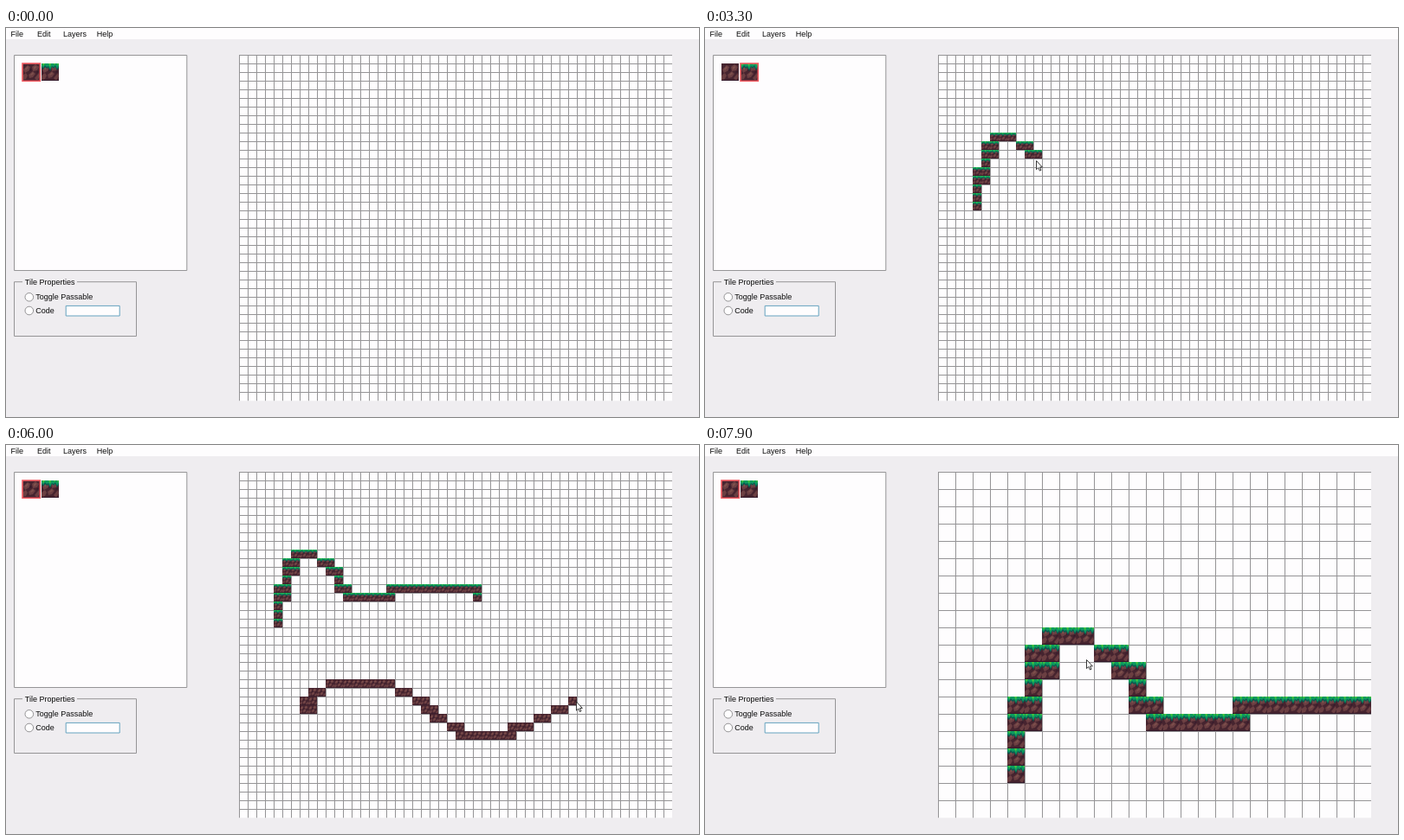
An HTML page that plays this animation: 800 px wide and 450 px high, repeating every 8 s.

```html
<!DOCTYPE html>
<html lang="en">
<head>
<meta charset="utf-8">
<title>Tile map editor</title>
<style>
html, body { margin: 0; width: 100%; height: 100%; overflow: hidden; background: #efedf0; }
svg { display: block; width: 800px; height: 450px; }
text { font: 9px "Liberation Sans", Arial, sans-serif; fill: #0c0c0c; }
.line { fill: none; stroke: #959496; }
.paper { fill: #fefdfe; }
</style>
</head>
<body>
<svg viewBox="0 0 800 450">
  <defs>
    <g id="dirt">
      <path fill="#46242f" d="M0 0H20V20H0Z"/>
      <g fill="#6b3f42">
        <path d="M1 7L6 2 9 4 8 8 3 11Z"/>
        <path d="M11 4L15 1 19 4 17 8 12 9Z"/>
        <path d="M7 13L12 9 15 12 12 16 8 17Z"/>
        <path d="M0 14L4 11 6 14 4 18 0 19Z"/>
        <path d="M14 17L19 11 20 15 17 20Z"/>
      </g>
      <path fill="#7e504c" d="M3 6L6 3 7 5 4 8ZM13 4L16 3 16 5 13 7ZM9 13L12 10 13 12 10 14Z"/>
      <path fill="#341a2b" d="M0 19H20V20H0ZM9 5L11 8 8 9ZM17 9L19 9 16 12Z"/>
    </g>
    <g id="grass">
      <use href="#dirt"/>
      <path fill="#0b5a50" d="M0 0H20V5L18 8 16 4 14 6 12 4 10 9 8 5 6 6 4 4 2 7 0 5Z"/>
      <path fill="#0b9a5f" d="M0 0H20V3L18 6 16 2 14 4 12 3 10 7 8 3 6 4 4 2 2 5 0 3Z"/>
      <path fill="#49c43c" d="M1 0H4L2 3ZM8 0H11L10 4ZM14 0H16L15 2ZM18 0H20L19 3Z"/>
    </g>
    <clipPath id="stage"><path d="M269 31H769V431.5H269Z"/></clipPath>
  </defs>

  <path fill="#efedf0" d="M0 0H800V450H0Z"/>
  <path class="paper" d="M0 0H800V13H0Z"/>
  <text x="5.5" y="9.6">File</text>
  <text x="36" y="9.6">Edit</text>
  <text x="66" y="9.6">Layers</text>
  <text x="104.7" y="9.6">Help</text>

  <path class="line paper" d="M9.5 31.5H208.8V280.5H9.5Z"/>
  <use href="#dirt" x="19" y="41"/>
  <use href="#grass" x="41" y="41"/>
  <rect id="hover" y="41.5" width="20" height="19.5" fill="none" stroke="#c9484d" stroke-dasharray="1.5 1"/>
  <rect id="picked" y="41" width="20.3" height="20.3" fill="none" stroke="#f25a60" stroke-width="1.6"/>

  <path class="line" d="M19 293.7H9.5V356.5H150.5V293.7H82"/>
  <text x="21.8" y="296.5">Tile Properties</text>
  <circle class="line paper" cx="26.8" cy="311.3" r="4.8"/>
  <circle class="line paper" cx="26.8" cy="327" r="4.8"/>
  <text x="34.2" y="314.4">Toggle Passable</text>
  <text x="34.2" y="330.2">Code</text>
  <path class="paper" stroke="#65a3bf" d="M69.2 321.4H131.2V333H69.2Z"/>

  <g clip-path="url(#stage)">
    <path class="paper" d="M269 31H769V431.5H269Z"/>
    <path id="grid" class="line"/>
    <g id="map"></g>
  </g>
  <path id="cursor" fill="#fff" stroke="#222" stroke-width=".9" stroke-linejoin="round"
    d="M.5 .5V10.6L2.8 8.5 4.4 12 6 11.3 4.5 7.9H7.4Z"/>
</svg>
<script>
const LOOP = 8000, STEP = 100;
const PICK_GRASS = 1700, PICK_DIRT = 4900, ZOOM_AT = 7400;
const LEFT = 269, TOP = 31, CELL = 10;
const EASE = 1.285, LAG = 10, SAMPLES = 4000;
const el = id => document.getElementById(id);
const mix = (a, b, p) => a.map((v, i) => v + (b[i] - v) * p);

// Brush paths in cell units; every cell they cross gets a tile
const strokes = [
  makeStroke("grass", 2500, 3900,
    "4.4,17.6 4.5,13.5 5.5,14.4 5.5,10.5 6.5,11.3 6.6,9.5 8.5,9.5 9.5,10.5 " +
    "11.3,11.7 11.3,12.9 12.8,14.9 17.9,13.95 27.9,13.5 27.9,14.5"),
  makeStroke("dirt", 5400, 6010,
    "8.5,27.5 7.5,27.5 7.5,26.5 10,25 14,24.1 18,25 20,26 24,29 " +
    "26,30.2 29,30.9 34,29 39.6,26.2")
];

// Pointer stops between the strokes
const stops = [
  { t: 900, at: [52, 51] }, { t: 1600, at: [54, 52] },
  { t: 2000, at: [404, 193] }, { t: 2100, at: [404, 193] },
  ...strokeEnds(strokes[0]),
  { t: 4700, at: [28, 52] }, { t: 4900, at: [28, 51] }, { t: 5300, at: [389, 319] },
  ...strokeEnds(strokes[1]),
  { t: 7300, at: [385, 207] }, { t: 7500, at: [385, 207] }, { t: 7900, at: [440, 248] }
];

function makeStroke(tile, start, end, text) {
  const points = text.split(" ").map(p => p.split(",").map(Number));
  const lengths = points.slice(1).map((p, i) => Math.hypot(p[0] - points[i][0], p[1] - points[i][1]));
  const total = lengths.reduce((a, b) => a + b);
  const stroke = { start, end, points, lengths, total, cells: new Map() };
  for (let i = 0; i < SAMPLES; i++) {
    const part = (i + 0.5) / SAMPLES;
    const [col, row] = along(stroke, part).map(Math.floor);
    const key = col + "," + row;
    if (stroke.cells.has(key)) continue;
    const time = start + (end - start) * part ** (1 / EASE) + LAG;
    stroke.cells.set(key, { node: addTile(tile, col, row), time });
  }
  return stroke;
}

function along({ points, lengths, total }, part) {
  let rest = part * total, i = 0;
  while (i < lengths.length - 1 && rest > lengths[i]) rest -= lengths[i++];
  return mix(points[i], points[i + 1], rest / lengths[i]);
}

function addTile(kind, col, row) {
  const use = document.createElementNS("http://www.w3.org/2000/svg", "use");
  use.setAttribute("href", "#" + kind);
  use.setAttribute("x", col * 20);
  use.setAttribute("y", row * 20);
  return el("map").appendChild(use);
}

function brushAt(stroke, t) {
  const part = ((t - stroke.start) / (stroke.end - stroke.start)) ** EASE;
  const [col, row] = along(stroke, part);
  return [LEFT + col * CELL, TOP + row * CELL];
}

function strokeEnds(stroke) {
  return [stroke.start, stroke.end].map(t => ({ t, at: brushAt(stroke, t) }));
}

function pointerAt(t) {
  const active = strokes.find(s => between(t, s.start, s.end));
  if (active) return brushAt(active, t);
  const i = stops.findIndex(s => s.t > t);
  if (i < 1) return (i ? stops[stops.length - 1] : stops[0]).at;
  const a = stops[i - 1], b = stops[i];
  return mix(a.at, b.at, (t - a.t) / (b.t - a.t));
}

function gridPath(size) {
  let d = "";
  for (let x = LEFT + 0.5; x < LEFT + 500; x += size) d += `M${x} 31V431.5`;
  for (let y = TOP + 0.5; y < TOP + 400; y += size) d += `M${LEFT} ${y}h500`;
  return d;
}

function show(node, on) {
  node.setAttribute("visibility", on ? "visible" : "hidden");
}

function between(t, a, b) {
  return t >= a && t < b;
}

function draw(time) {
  const t = Math.floor(time / STEP) * STEP;
  const zoom = t >= ZOOM_AT ? 2 : 1;
  el("grid").setAttribute("d", gridPath(CELL * zoom));
  el("map").setAttribute("transform", `translate(${LEFT} ${TOP}) scale(${zoom / 2})`);
  for (const stroke of strokes)
    for (const cell of stroke.cells.values()) show(cell.node, t >= cell.time);

  const onGrass = between(t, 900, PICK_GRASS);
  el("hover").setAttribute("x", onGrass ? 41.3 : 19.3);
  show(el("hover"), onGrass || between(t, 4700, PICK_DIRT));
  el("picked").setAttribute("x", between(t, PICK_GRASS, PICK_DIRT) ? 41 : 19);

  el("cursor").setAttribute("transform", `translate(${pointerAt(t)})`);
  show(el("cursor"), t >= stops[0].t);
}

const start = performance.now();
function tick() {
  draw((performance.now() - start) % LOOP);
  requestAnimationFrame(tick);
}
tick();
</script>
</body>
</html>
```
